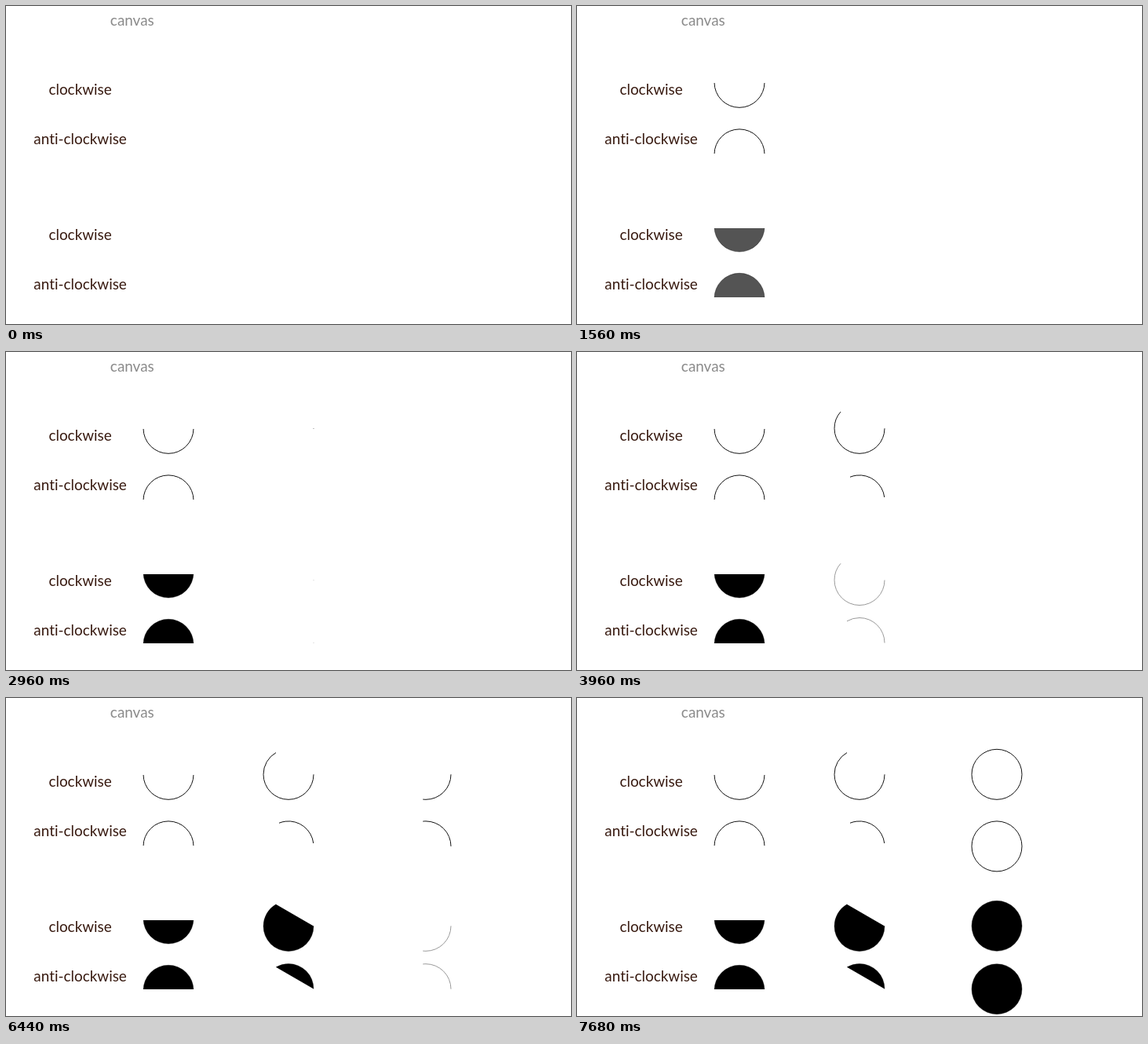
An HTML page with a canvas for the animation above (9640 ms loop, 720x405 px).

```html
<!DOCTYPE html>
<html lang="en">
<head>
<meta charset="utf-8">
<title>Arc directions</title>
<style>
  html, body { margin: 0; width: 720px; height: 405px; overflow: hidden; background: #fff; }
  canvas, svg { position: absolute; left: 0; top: 0; width: 720px; height: 405px; }
  text {
    font: 18.9px Lato, "Open Sans", sans-serif;
    font-variant-ligatures: none;
    text-anchor: middle;
    fill: #381a10;
  }
  .title { fill: #8a8a8a; }
</style>
</head>
<body>
<canvas id="stage" width="720" height="405"></canvas>
<svg viewBox="0 0 720 405">
  <text class="title" x="160.8" y="25">canvas</text>
  <text x="94.6" y="113">clockwise</text>
  <text x="94.6" y="176">anti-clockwise</text>
  <text x="94.6" y="298">clockwise</text>
  <text x="94.6" y="361">anti-clockwise</text>
</svg>
<script>
const LOOP = 9640, STEP = 40, SWEEP = 1760, FADE = 850, R = 32;
const ctx = document.getElementById("stage").getContext("2d");
const rad = deg => deg * Math.PI / 180;

const ease = p => {
  p = Math.min(1, Math.max(0, p));
  return 0.5 - 0.5 * Math.cos(Math.PI * p);
};

// dir: 1 clockwise, -1 anti-clockwise; from/to: visible span in degrees
const arc = (y, dir, to, opts = {}) =>
  ({ y, dir, to, from: 0, top: 0, bottom: 405, ...opts });

const columns = [
  { x: 207, start: 85, fade: 1040,
    lines: [arc(97.3, 1, 180, { top: 98 }), arc(188.9, -1, 180, { bottom: 188 })],
    solids: [arc(281, 1, 180, { top: 283 }), arc(372.3, -1, 180, { bottom: 371 })] },
  { x: 360, start: 2950, fade: 3940,
    lines: [arc(97.3, 1, 240), arc(188.9, -1, 112, { from: 7 })],
    solids: [arc(290.5, 1, 240), arc(370.5, -1, 120)] },
  { x: 535, start: 5830, fade: 6820,
    lines: [arc(97.3, 1, 360), arc(188.9, -1, 360)],
    solids: [arc(290.3, 1, 360), arc(370.7, -1, 360)] }
];

function trace(x, a, to) {
  ctx.beginPath();
  ctx.arc(x, a.y, R, rad(a.from * a.dir), rad(to * a.dir), a.dir < 0);
}

function clipped(a, paint) {
  ctx.save();
  ctx.beginPath();
  ctx.rect(0, a.top, 720, a.bottom - a.top);
  ctx.clip();
  paint();
  ctx.restore();
}

function drawLine(x, a, angle, color) {
  const to = Math.min(a.to, angle);
  if (to <= a.from) return;
  clipped(a, () => {
    trace(x, a, to);
    ctx.strokeStyle = color;
    ctx.stroke();
  });
}

function drawSolid(x, a, alpha) {
  clipped(a, () => {
    trace(x, a, a.to);
    ctx.fillStyle = `rgba(0,0,0,${alpha})`;
    ctx.fill();
  });
}

function render(t) {
  ctx.clearRect(0, 0, 720, 405);
  ctx.lineWidth = 1;
  for (const { x, start, fade, lines, solids } of columns) {
    if (t < start) continue;
    const angle = Math.max(1, 360 * ease((t - start) / SWEEP));
    const alpha = ease((t - fade) / FADE);
    lines.forEach(a => drawLine(x, a, angle, "#111"));
    solids.forEach(a => {
      drawLine(x, a, angle, "#999");
      if (alpha > 0) drawSolid(x, a, alpha);
    });
  }
}

const origin = performance.now();
function tick() {
  const t = (performance.now() - origin) % LOOP;
  render(Math.floor(t / STEP) * STEP);
  requestAnimationFrame(tick);
}
tick();
</script>
</body>
</html>
```
